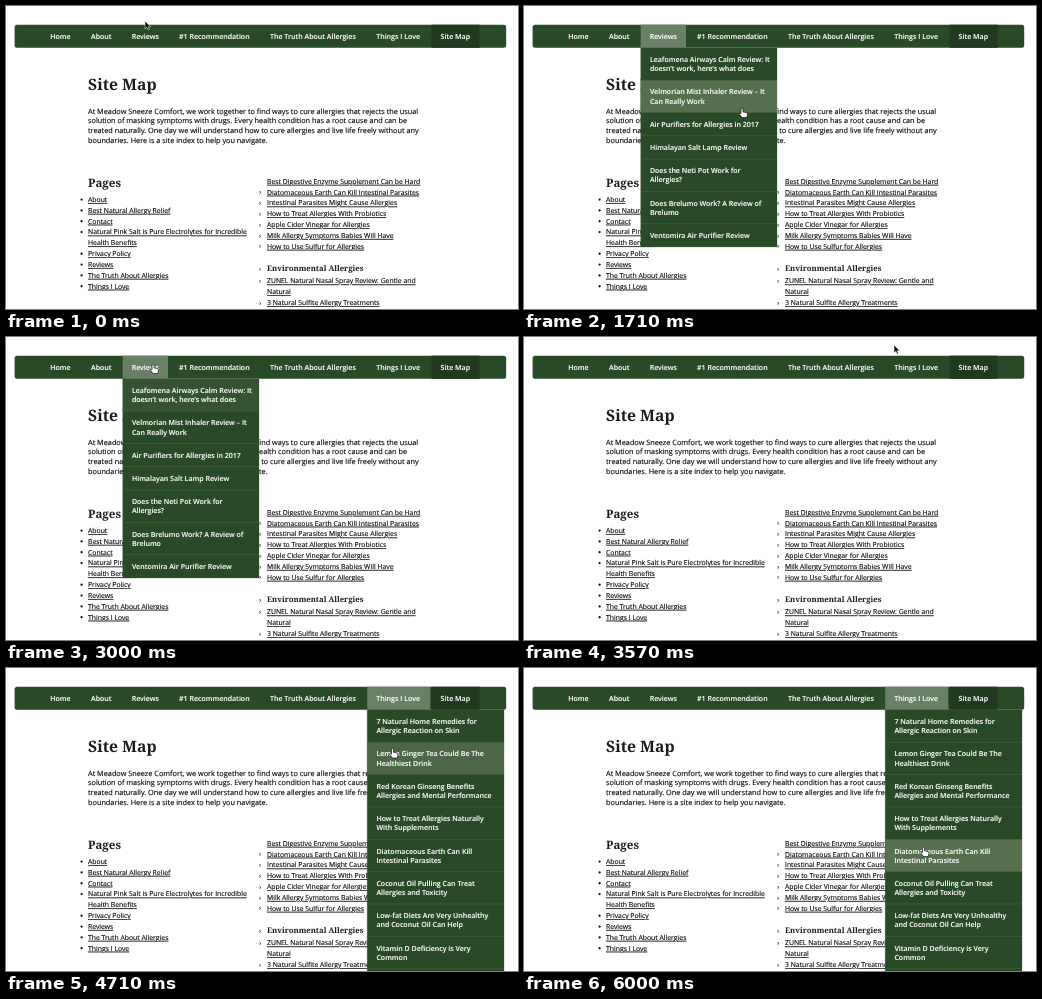
Write an HTML page that moves like this. It is 512 px wide and 303 px high and loops after 6140 ms.

```html
<!DOCTYPE html>
<html lang="en">
<head>
<meta charset="utf-8">
<title>Site Map</title>
<style>
html, body { margin: 0; width: 100%; height: 100%; overflow: hidden; background: #fff; }
svg { display: block; width: 512px; height: 303px; }
text { font-family: "Open Sans", "Noto Sans", sans-serif; text-rendering: geometricPrecision;
  fill: #000; stroke: #000; stroke-width: .12px; }
.h { font-family: "Noto Serif", serif; font-weight: 700; fill: #1c1c1c; stroke: none; }
.p { font-size: 7.32px; }
.link { font-size: 6.85px; text-decoration: underline; }
.nav { font-size: 7.04px; font-weight: 600; fill: #fff; stroke: #fff; }
.mark { font-size: 6px; }
</style>
</head>
<body>
<svg id="stage" viewBox="0 0 512 303"></svg>
<script>
const stage = document.getElementById('stage');
const GREEN = '#284a26', BAR_TOP = 18.7, BAR_BOTTOM = 41.8;

function add(tag, attrs, parent = stage, content = '') {
  const el = document.createElementNS('http://www.w3.org/2000/svg', tag);
  for (const k in attrs) el.setAttribute(k, attrs[k]);
  el.textContent = content;
  parent.append(el);
  return el;
}
const text = (x, y, cls, content, parent, size) =>
  add('text', { x, y, class: cls, ...(size && { 'font-size': size }) }, parent, content);
const rect = (x, y, width, height, fill, parent, more) =>
  add('rect', { x, y, width, height, fill, ...more }, parent);

// Page body
text(82, 83.7, 'h', 'Site Map', stage, 15.7);
[
  'At Meadow Sneeze Comfort, we work together to find ways to cure allergies that rejects the usual',
  'solution of masking symptoms with drugs. Every health condition has a root cause and can be',
  'treated naturally. One day we will understand how to cure allergies and live life freely without any',
  'boundaries. Here is a site index to help you navigate.'
].forEach((s, i) => text(82, 107.6 + i * 9.75, 'p', s));

// A leading "+" marks a line that continues the entry above it.
function list(x, y, lines, bullet) {
  lines.forEach((s, i) => {
    const base = y + i * 10.83;
    text(x, base, 'link', s.replace('+', ''));
    if (s[0] !== '+') bullet(base);
  });
}
const disc = y => add('circle', { cx: 75.6, cy: y - 2.4, r: 1.15, fill: '#111' });
const mark = y => text(253.3, y - .3, 'mark', '›');

text(82, 181.1, 'h', 'Pages', stage, 11.6);
list(82, 196, ['About', 'Best Natural Allergy Relief', 'Contact',
  'Natural Pink Salt is Pure Electrolytes for Incredible', '+Health Benefits',
  'Privacy Policy', 'Reviews', 'The Truth About Allergies', 'Things I Love'], disc);
list(261, 177.8, ['+Best Digestive Enzyme Supplement Can be Hard',
  'Diatomaceous Earth Can Kill Intestinal Parasites', 'Intestinal Parasites Might Cause Allergies',
  'How to Treat Allergies With Probiotics', 'Apple Cider Vinegar for Allergies',
  'Milk Allergy Symptoms Babies Will Have', 'How to Use Sulfur for Allergies'], mark);
text(261, 264.8, 'h', 'Environmental Allergies', stage, 7.75);
mark(264.8);
list(261, 277.4, ['ZUNEL Natural Nasal Spray Review: Gentle and', '+Natural',
  '3 Natural Sulfite Allergy Treatments'], mark);

// Navigation bar
rect(8.6, BAR_TOP, 491.6, BAR_BOTTOM - BAR_TOP, GREEN, stage, { rx: 2.5 });
rect(425.5, BAR_TOP, 48, BAR_BOTTOM - BAR_TOP, '#1f3a1e');

function makeMenu(x, tabWidth, width, entries) {
  const tab = rect(x, BAR_TOP, tabWidth, BAR_BOTTOM - BAR_TOP, '#698067');
  const panel = add('g', {});
  const items = [];
  let y = BAR_BOTTOM;
  const heights = entries.map(e => 14.15 + 9.1 * e.split('|').length);
  const total = heights.reduce((a, b) => a + b);
  rect(x - .6, y, width + 1.2, total + .6, '#000', panel, { opacity: .15 });
  rect(x, y, width, total, GREEN, panel);
  entries.forEach((entry, i) => {
    const glow = rect(x, y, width, heights[i], '#57714f', panel);
    items.push({ top: y, bottom: y + heights[i], glow });
    if (i) rect(x, y - .25, width, .6, '#456342', panel);
    entry.split('|').forEach((s, j) => text(x + 9.2, y + 14.3 + j * 9.1, 'nav', s, panel));
    y += heights[i];
  });
  return { x, tabWidth, width, bottom: y, tab, panel, items };
}

const menus = [
  makeMenu(116.7, 45.3, 136.3, [
    'Leafomena Airways Calm Review: It|doesn’t work, here’s what does',
    'Velmorian Mist Inhaler Review – It|Can Really Work',
    'Air Purifiers for Allergies in 2017', 'Himalayan Salt Lamp Review',
    'Does the Neti Pot Work for|Allergies?', 'Does Brelumo Work? A Review of|Brelumo',
    'Ventomira Air Purifier Review']),
  makeMenu(361.2, 63, 136.8, [
    '7 Natural Home Remedies for|Allergic Reaction on Skin',
    'Lemon Ginger Tea Could Be The|Healthiest Drink',
    'Red Korean Ginseng Benefits|Allergies and Mental Performance',
    'How to Treat Allergies Naturally|With Supplements',
    'Diatomaceous Earth Can Kill|Intestinal Parasites',
    'Coconut Oil Pulling Can Treat|Allergies and Toxicity',
    'Low-fat Diets Are Very Unhealthy|and Coconut Oil Can Help',
    'Vitamin D Deficiency is Very|Common', ' '])
];

[[44.3, 'Home'], [85, 'About'], [125.7, 'Reviews'], [173, '#1 Recommendation'],
  [264, 'The Truth About Allergies'], [370.2, 'Things I Love'], [434.6, 'Site Map']
].forEach(([x, s]) => text(x, 33, 'nav', s));

// Pointer
const arrow = add('path', { d: 'M0 0v8l1.9-1.7 1.2 2.9 1.3-.6-1.2-2.8h2.5z',
  fill: '#111', stroke: '#fff', 'stroke-width': .5 });
const hand = add('path', {
  d: 'M-1 1a1 1 0 0 1 2 0v2.8l3.3.7q1.5.4 1.2 2L4.8 9.6H0L-2.7 6q0-1.3 1.3-.7l.4.4z',
  fill: '#fff', stroke: '#111', 'stroke-width': .7 });

// Pointer path: step, x, y
const path = [
  [0, 139, 15], [1, 139, 22], [4, 138.7, 32], [7, 138.7, 32], [9, 160, 58], [11, 209, 95],
  [12, 218, 102], [16, 218, 102], [18, 200, 84], [20, 155, 48], [21, 147, 27], [22, 175, 16],
  [23, 270, 2], [24, 360, 3], [25, 370, 8], [26, 376, 15], [27, 380, 24], [28, 381.5, 27],
  [31, 381.5, 28], [32, 382, 36], [34, 391, 125], [35, 394, 156], [36, 396.5, 171],
  [39, 399.5, 179], [43, 399.5, 179]
];
function pointer(step) {
  const i = Math.max(1, path.findIndex(p => p[0] >= step));
  const [s0, x0, y0] = path[i - 1], [s1, x1, y1] = path[i];
  const k = (step - s0) / (s1 - s0);
  return [x0 + (x1 - x0) * k, y0 + (y1 - y0) * k];
}

const inMenu = (m, [x, y]) => x >= m.x && y >= BAR_TOP && y < m.bottom &&
  x < m.x + (y < BAR_BOTTOM ? m.tabWidth : m.width);

function draw(now) {
  const step = Math.floor((now % 6140 + 4) / 142.8);
  const trail = [0, 1, 2, 3].map(k => pointer(Math.max(0, step - k)));
  const pos = trail[0];
  const fade = test => .75 * test(pos) + .25 * test(trail[1]);
  let over = false;
  for (const m of menus) {
    const shown = fade(p => inMenu(m, p));
    // The tab lights up more slowly than its menu opens.
    const lit = trail.filter(p => inMenu(m, p)).length / trail.length;
    m.tab.setAttribute('opacity', Math.min(shown, lit));
    m.panel.setAttribute('opacity', shown);
    for (const it of m.items)
      it.glow.setAttribute('opacity', fade(p => inMenu(m, p) && p[1] >= it.top && p[1] < it.bottom));
    over ||= inMenu(m, pos);
  }
  for (const [el, on] of [[arrow, !over], [hand, over]]) {
    el.setAttribute('transform', `translate(${pos})`);
    el.setAttribute('opacity', +on);
  }
}

const start = performance.now();
(function loop() {
  draw(performance.now() - start);
  requestAnimationFrame(loop);
})();
</script>
</body>
</html>
```
